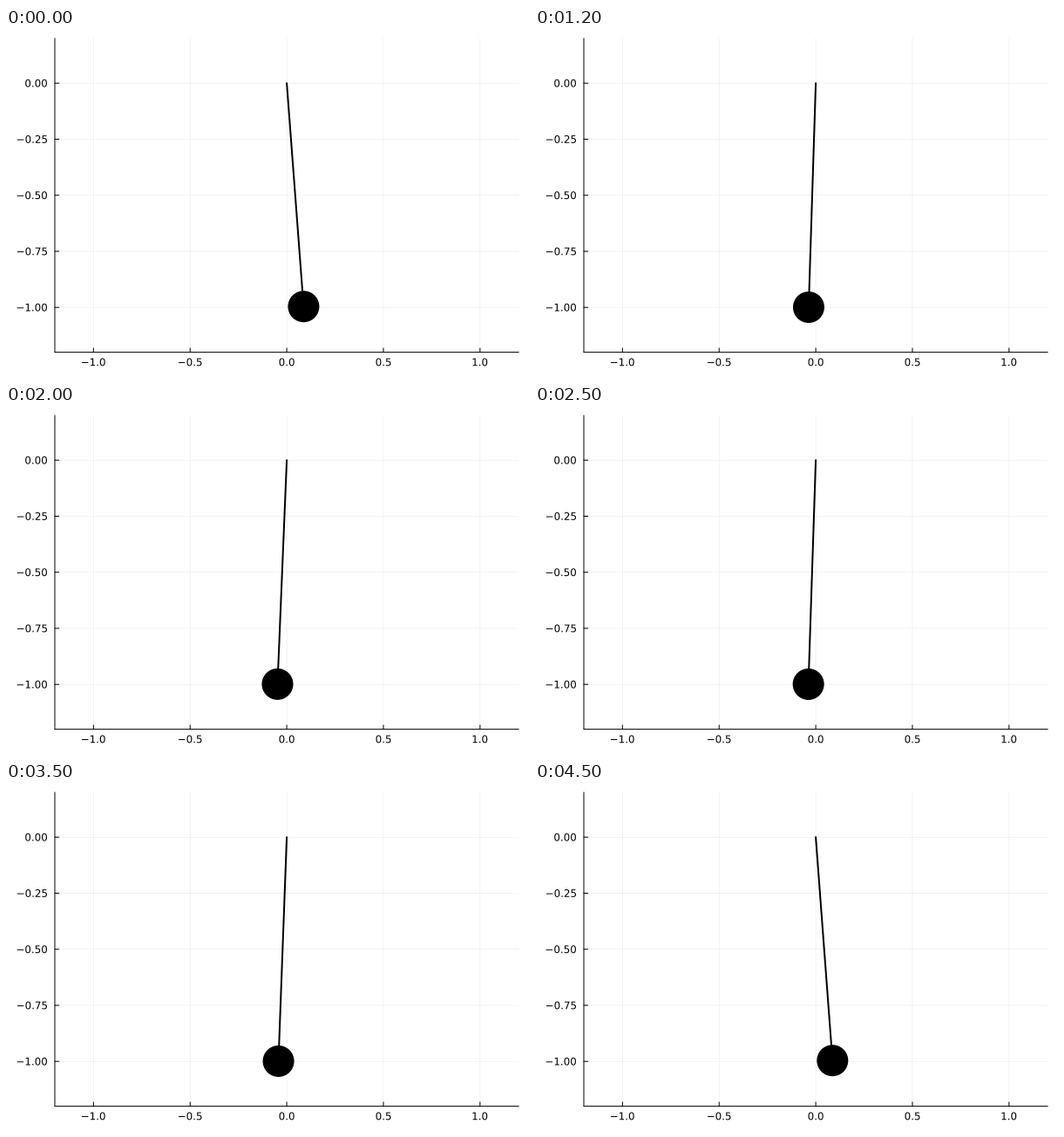
Animation of 600 by 400 pixels, one loop 4600 ms. Source, as a matplotlib script:

```python
import math
import matplotlib.pyplot as plt
from matplotlib.animation import FuncAnimation
from matplotlib.patches import Circle, PathPatch
from matplotlib.path import Path
from matplotlib.textpath import TextPath

W, H, DPI = 600, 400, 100
PX = 72 / DPI                      # points per pixel
LEFT, RIGHT, TOP, BOTTOM = 56.0, 588.19, 11.81, 371.61
TICK = 4.72
FONT_PX = 11.85
FRAMES, INTERVAL = 46, 100

AMP = math.radians(5)
OMEGA = math.sqrt(9.81) * (1 - AMP ** 2 / 16)
END = 10 * OMEGA                   # phase after ten seconds
RELTOL, ABSTOL = 1e-3, 1e-6 / AMP


def step_error(p, step):
    """Error of one fifth-order step, relative to the tolerance."""
    new = p + step
    raw = complex(1.56e-4 * step ** 6, 4.265e-4 * step ** 5 - 2.17e-5 * step ** 7)
    e = raw * complex(math.cos(p), math.sin(p))
    cos = max(abs(math.cos(p)), abs(math.cos(new)))
    sin = max(abs(math.sin(p)), abs(math.sin(new)))
    ex = e.real / (RELTOL * cos + ABSTOL)
    ev = e.imag / (RELTOL * sin + ABSTOL / OMEGA)
    return math.hypot(ex, ev) / math.sqrt(2)


def swing_phases():
    """Phases whose spacing grows under PI step-size control."""
    p, step, last = 0.0, 0.00362, 1e-4
    phases = [p]
    while p < END - 1e-9:
        step = min(step, END - p)
        err = step_error(p, step)
        p += step
        phases.append(p)
        step *= min(10, 0.9 * last ** 0.08 / err ** 0.14)
        last = max(err, 1e-4)
    return phases


def px(x):
    return LEFT + (x + 1.2) / 2.4 * (RIGHT - LEFT)


def py(y):
    return BOTTOM - (y + 1.2) / 1.4 * (BOTTOM - TOP)


fig = plt.figure(figsize=(W / DPI, H / DPI), dpi=DPI, facecolor="white")
ax = fig.add_axes([0, 0, 1, 1])
ax.set_xlim(0, W)
ax.set_ylim(H, 0)
ax.axis("off")


def line(xs, ys, width=1.0, **kw):
    return ax.plot(xs, ys, color="black", lw=width * PX, snap=False,
                   solid_capstyle="round", **kw)[0]


def grid(xs, ys):
    line(xs, ys, 0.5, alpha=0.1)


def label(x, base, text, align):
    """Outline text; align 0.5 centres it on x, 1 ends it there."""
    glyphs = TextPath((0, 0), text.replace("-", "\u2212"), size=FONT_PX,
                      prop={"family": "DejaVu Sans"})
    box = glyphs.get_extents()
    shift = x - box.x0 - align * box.width
    path = Path(glyphs.vertices * [1, -1] + [shift, base], glyphs.codes)
    ax.add_patch(PathPatch(path, facecolor="black", lw=0, snap=False))


for i in range(5):
    v = -1 + i / 2
    x = px(v)
    grid([x, x], [TOP, BOTTOM])
    line([x, x], [BOTTOM - TICK, BOTTOM])
    label(x, 387.21, f"{v:.1f}", 0.5)

    v = -1 + i / 4
    y = py(v)
    grid([LEFT, RIGHT], [y, y])
    line([LEFT, LEFT + TICK], [y, y])
    label(LEFT - 9, y + 4.32, f"{v:.2f}", 1)

line([LEFT, LEFT], [TOP, BOTTOM])
line([LEFT, RIGHT], [BOTTOM, BOTTOM])

rod = line([], [], 2.0, zorder=3)
bob = Circle((0, 0), 18, facecolor="black", edgecolor="none", zorder=4)
ax.add_patch(bob)

phases = swing_phases()


def draw(i):
    a = AMP * math.cos(phases[min(i, len(phases) - 1)])
    x, y = px(math.sin(a)), py(-math.cos(a))
    rod.set_data([px(0), x], [py(0), y])
    bob.center = (x, y)
    return rod, bob


anim = FuncAnimation(fig, draw, frames=FRAMES, init_func=lambda: draw(0),
                     interval=INTERVAL, repeat=True, repeat_delay=0)
plt.show()
```
